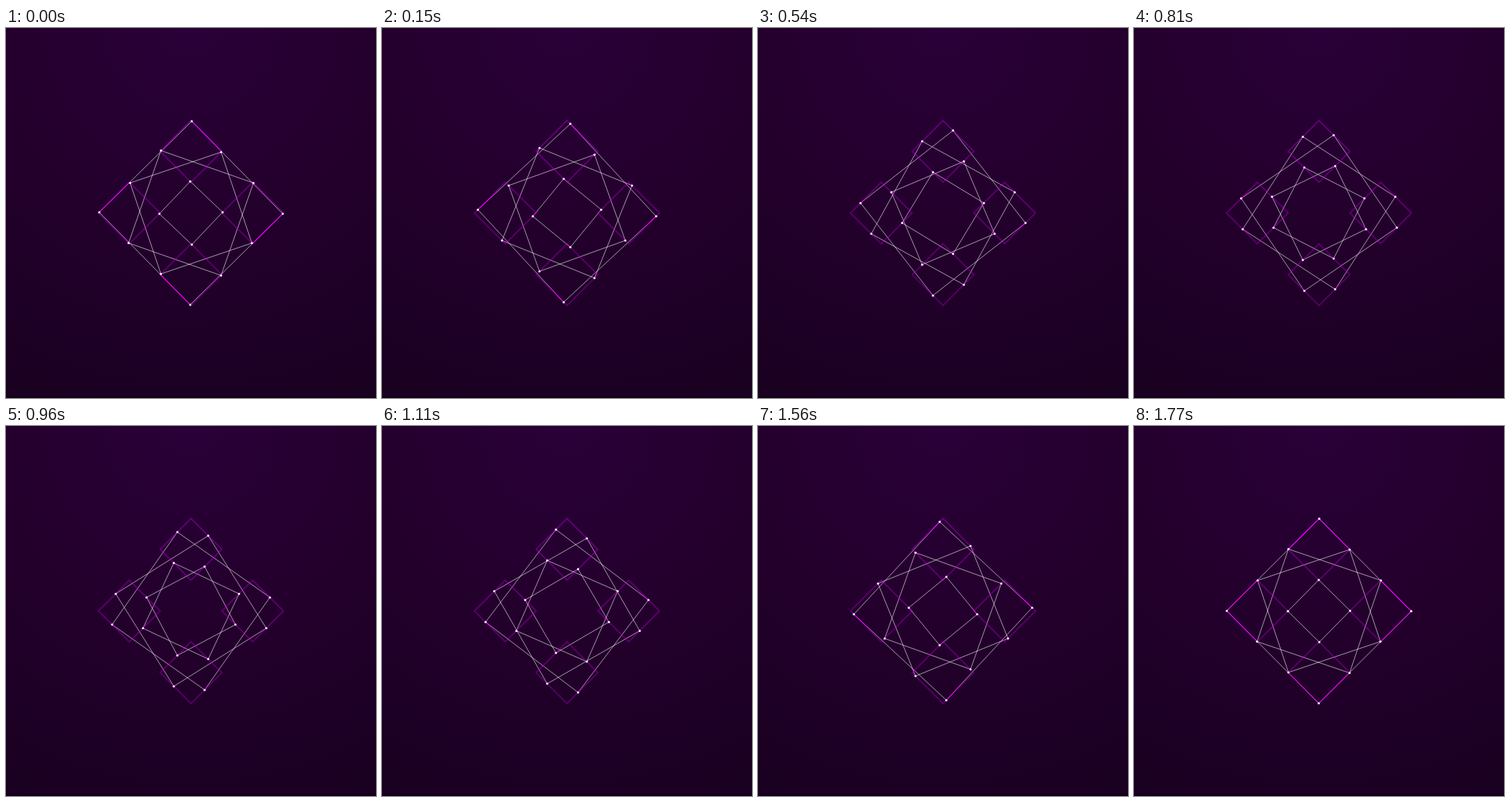
An HTML page that plays this animation: 512x512 px, repeating every 1.8 s.

```html
<!DOCTYPE html>
<html lang="en">
<head>
<meta charset="utf-8">
<title>Orbiting squares</title>
<style>
  html, body { margin: 0; width: 100%; height: 100%; overflow: hidden; background: #1f0028; }
  svg { display: block; width: 100%; height: 100%; }
  .thread { fill: none; stroke: #fff; stroke-opacity: .6; stroke-width: 1; }
  .track { fill: none; stroke: #f0f; stroke-width: 2; mix-blend-mode: overlay; }
  .haze { fill: none; stroke: #f0f; stroke-opacity: .1; stroke-width: 2; }
  .dot { fill: #fff; }
</style>
</head>
<body>
<svg viewBox="0 0 512 512">
  <defs>
    <radialGradient id="night" gradientUnits="userSpaceOnUse" cx="256" cy="0" r="580">
      <stop offset="0" stop-color="#2a0038"/>
      <stop offset=".45" stop-color="#24002d"/>
      <stop offset="1" stop-color="#190020"/>
    </radialGradient>
  </defs>
  <rect width="512" height="512" fill="url(#night)"/>
  <rect y="510" width="512" height="2" fill="#12001a"/>
  <g id="scene"></g>
</svg>
<script>
const LOOP = 1800, STEP = 30, LEAD = 45;
const CENTER = 256, HALF = 128 / 3;
const scene = document.getElementById('scene');

function add(tag, attrs) {
  const node = document.createElementNS('http://www.w3.org/2000/svg', tag);
  for (const key in attrs) node.setAttribute(key, attrs[key]);
  return scene.appendChild(node);
}

// The same point turned by 0, 90, 180 and 270 degrees around the stage centre.
function quarterTurns([x, y]) {
  return [[x, y], [-y, x], [-x, -y], [y, -x]].map(([a, b]) => [CENTER + a, CENTER + b]);
}

// Corners of the top diamond, clockwise, relative to the stage centre.
const corners = [[0, -3], [1, -2], [0, -1], [-1, -2]].map(p => p.map(v => v * HALF));
const turned = corners.map(quarterTurns);

const threads = corners.map(() => add('polygon', { class: 'thread' }));
for (let side = 0; side < 4; side++) {
  const points = turned.map(set => set[side]).join(' ');
  add('polygon', { class: 'track', points });
  add('polygon', { class: 'haze', points });
}
const dots = corners.map(() => [0, 1, 2, 3].map(() => add('circle', { class: 'dot', r: 1.5 })));

function draw(time) {
  const held = Math.floor((time + 0.5) / STEP) * STEP;
  const progress = ((held + LEAD) % LOOP) / LOOP;
  corners.forEach((from, i) => {
    const to = corners[(i + 1) % 4];
    const points = quarterTurns(from.map((v, axis) => v + (to[axis] - v) * progress));
    threads[i].setAttribute('points', points.join(' '));
    points.forEach(([x, y], side) => {
      dots[i][side].setAttribute('cx', x);
      dots[i][side].setAttribute('cy', y);
    });
  });
}

function tick() {
  draw(performance.now());
  requestAnimationFrame(tick);
}
tick();
</script>
</body>
</html>
```
